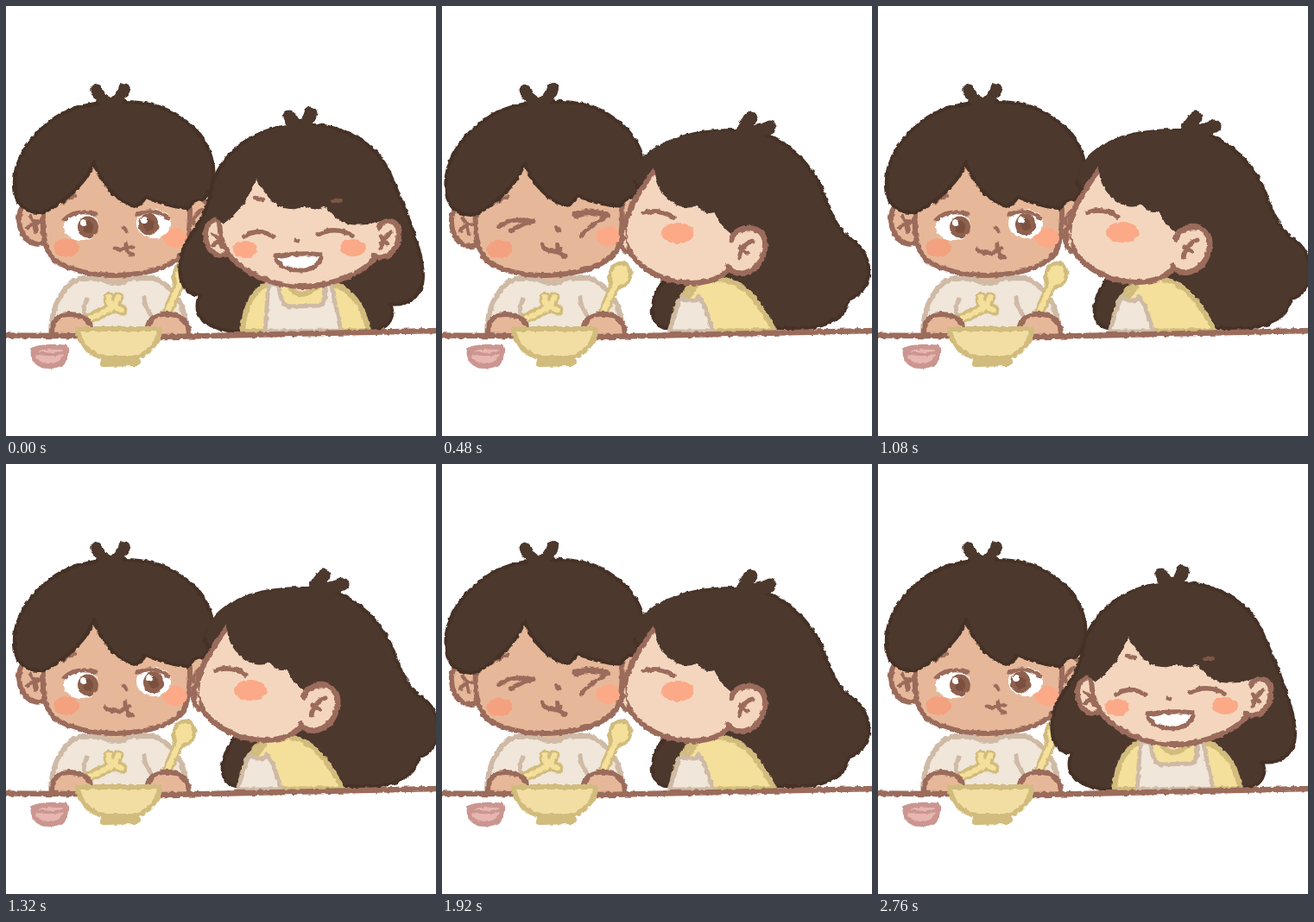
Recreate the animation shown at these times as an HTML page. Size 498x498 px, loop 2880 ms.

```html
<!DOCTYPE html>
<html lang="en">
<head>
<meta charset="utf-8">
<title>Kiss on the cheek</title>
<style>
  html, body { margin: 0; width: 100%; height: 100%; overflow: hidden; background: #fff; }
  svg { display: block; width: 498px; height: 498px; stroke-linecap: round; stroke-linejoin: round; }
</style>
</head>
<body>
<svg viewBox="0 0 498 498">
  <filter id="crayon" filterUnits="userSpaceOnUse" x="0" y="0" width="498" height="498" color-interpolation-filters="sRGB">
    <feTurbulence type="fractalNoise" baseFrequency="0.2" numOctaves="1" seed="4" result="grain"/>
    <feDisplacementMap in="SourceGraphic" in2="grain" scale="4.5" xChannelSelector="R" yChannelSelector="G"/>
  </filter>
  <g id="scene" filter="url(#crayon)"></g>
</svg>
<script>
const STEP = 120, STEPS = 24;
const HAIR = '#4c382d', HAIR_EDGE = '#463126', LINE = '#9b6b5b', IRIS = '#8e604d';
const TAN = '#e6b899', PEACH = '#f4d6be', BLUSH = '#fba987', BLUSH_TAN = '#f4a17f';
const CREAM = '#f0e6d9', CREAM_EDGE = '#cfbaa6', YELLOW = '#f5e09b', YELLOW_EDGE = '#d1bc7d';

const shape = (d, fill, stroke = 'none', w = 6) =>
  `<path d="${d}" fill="${fill}" stroke="${stroke}" stroke-width="${w}"/>`;
const line = (d, w = 4.5, color = LINE) => shape(d, 'none', color, w);
const oval = (x, y, rx, ry, fill) => `<ellipse cx="${x}" cy="${y}" rx="${rx}" ry="${ry}" fill="${fill}"/>`;
const group = (transform, body) => `<g transform="${transform}">${body}</g>`;

// Blend two paths that share the same commands
const NUM = /-?\d+(\.\d+)?/g;
function mix(a, b, k) {
  const to = b.match(NUM);
  let i = 0;
  return a.replace(NUM, v => (+v + (to[i++] - v) * k).toFixed(2));
}

// Front-facing and turned-aside versions of each part of the girl
const GIRL = {
  back: [
    'M343,138C390,135 430,160 445,195C462,235 482,280 483,312C483,338 462,348 445,345C452,360 442,372 432,374L265,377C236,374 214,362 224,335C204,334 198,312 203,290C208,265 232,250 237,215C246,170 290,138 343,138Z',
    'M350,144C394,143 428,174 446,210C456,238 464,258 478,268C508,286 510,328 478,340C474,362 452,371 430,373L266,373C242,368 250,335 264,318C262,300 264,280 266,260C260,235 240,220 230,205C238,160 290,143 350,144Z'],
  tuft: [
    'M341,140Q331,136 328,128M345,138Q351,132 353,124',
    'M358,144Q360,136 368,129M368,145Q380,144 390,139'],
  shirt: [
    'M274,377C276,345 290,322 312,320L372,320C400,325 416,350 419,376Z',
    'M270,377C274,350 282,330 300,320L325,316C358,318 374,348 390,376Z'],
  collar: ['M324,322Q342,346 364,321', 'M288,338Q294,334 299,324'],
  apron: [
    'M304,322L300,377L388,376L376,320L368,320Q373,345 362,347L328,348Q317,346 316,322Z',
    'M280,341L268,377L319,377L309,347L302,336Q300,341 296,341L290,341Q286,341 284,338Z'],
  earL: [
    'M252,248C236,244 228,258 232,272C236,290 250,292 260,285',
    'M285,248C270,244 262,258 264,272C268,290 282,292 292,285'],
  foldL: ['M238,264Q248,268 250,280M240,277L249,269', 'M270,264Q280,268 282,280M272,277L281,269'],
  face: [
    'M247,225C245,262 250,285 268,298C290,317 320,325 343,325C380,324 418,309 432,285C438,268 438,250 436,215C420,150 270,150 247,225Z',
    'M258,186C244,208 222,232 221,264C224,292 250,310 276,317C305,324 335,318 345,299C350,280 350,255 340,220C330,150 275,160 258,186Z'],
  bangs: [
    'M343,139C400,140 440,185 447,240C432,254 405,254 390,249C377,242 376,234 368,231C362,236 352,234 346,229C338,236 320,236 308,224C298,212 292,204 290,195C284,215 270,240 252,250C238,245 240,215 250,195C268,160 300,139 343,139Z',
    'M350,145C395,145 400,200 385,255C375,262 360,262 346,262C336,255 330,245 326,236C318,240 312,236 306,228C296,234 284,230 276,224C264,215 258,206 256,182C253,184 249,186 245,188C239,192 235,196 232,200C238,160 290,145 350,145Z'],
  earR: [
    'M432,256C440,244 456,248 455,265C454,285 440,295 426,289',
    'M345,270C350,250 388,250 384,279C381,307 352,317 341,301'],
  foldR: ['M446,262Q436,268 434,280M434,267L442,276', 'M370,271Q358,274 354,291M355,279L364,285'],
  eyeL: ['M276,267Q291,256 309,267', 'M224,246Q226,242 229,246'],
  eyeR: ['M361,265Q381,254 401,266', 'M243,239Q262,233 278,244'],
  nose: ['M335,271L338,272', 'M222,262L224,263'],
  smile: [
    'M312,290Q340,285 365,288C366,299 352,307 340,306C324,306 314,300 312,290Z',
    'M224,272Q228,270 232,272C232,278 230,282 228,282C226,282 224,278 224,272Z']
};

function girl(k, kiss) {
  const at = name => mix(...GIRL[name], k);
  const lerp = (a, b) => a + (b - a) * k;
  const body =
    shape(at('shirt'), YELLOW, YELLOW_EDGE) +
    shape(at('collar'), PEACH, YELLOW_EDGE) +
    shape(at('apron'), CREAM, CREAM_EDGE, 5);
  let face =
    shape(at('earL'), PEACH, LINE) + line(at('foldL')) +
    shape(at('face'), PEACH, LINE) +
    oval(lerp(402, 283), lerp(280, 262), lerp(15, 19), lerp(10, 12), BLUSH) +
    line(at('eyeR'), 5.5);
  if (k === 1) {
    face += shape('M222,254Q214,261 220,268Q213,275 224,284', PEACH, LINE, 5.5);
  } else {
    face += oval(lerp(277, 228), lerp(282, 280), lerp(14, 3), 10, BLUSH) +
      line(at('eyeL'), 5.5) + line(at('nose'), 5) +
      shape(at('smile'), '#fff', LINE, 5);
    if (!k) face += line('M288,222L298,224');
  }
  const fringe =
    shape(at('bangs'), HAIR, HAIR, 3) +
    (k ? '' : line('M379,226L388,225', 4, '#7d5646')) +
    shape(at('earR'), PEACH, LINE, 6.5) + line(at('foldR'), 5);
  const lean = kiss ? 'translate(-10 1)' : '';
  return group(kiss ? 'translate(-7 0)' : '',
      shape(at('back'), HAIR, HAIR_EDGE, 4)) +
    group(lean, line(at('tuft'), 15, HAIR)) +
    group(kiss ? 'translate(-5 0)' : '', body) +
    group(lean, face + fringe);
}

function openEyes(lookX) {
  const eye = (x, y, px, lid) =>
    oval(x, y, 20, 17, '#fff') +
    oval(px, y + 1, 12, 12.5, IRIS) +
    oval(px, y + 1, 6, 7, '#7b503f') +
    oval(px - 5, y - 4, 4, 4, '#fff') + line(lid, 5);
  return eye(87, 255, 95, 'M67,248Q80,234 105,241') +
    eye(171, 252, lookX, 'M152,242Q170,232 188,246');
}

const shutEyes =
  line('M70,254Q86,243 110,249M83,259Q95,252 110,249', 5) +
  line('M159,243Q176,237 194,244', 8.5) +
  line('M165,268Q172,257 197,245', 5);

function boyBody() {
  const fork = 'M97,362L124,349M119,337Q119,346 124,349L134,352M125,348L130,337';
  const spoon = 'M187,354L201,322';
  const ladle = (grow, color) => group('rotate(24 206 312)', oval(206, 312, 8 + grow, 11 + grow, color));
  return shape('M52,377C53,345 66,325 84,316L170,315C190,322 203,340 207,360L209,379Z', CREAM, CREAM_EDGE) +
    shape('M106,312Q126,330 148,313', TAN, CREAM_EDGE) +
    line('M94,340Q88,350 92,362M160,338Q161,350 168,358', 5, CREAM_EDGE) +
    line(fork, 13, YELLOW_EDGE) + line(fork, 6, YELLOW) +
    line(spoon, 12, YELLOW_EDGE) + ladle(6, YELLOW_EDGE) +
    line(spoon, 6, YELLOW) + ladle(1.5, YELLOW) +
    shape('M53,379C53,358 68,355 82,358C95,360 100,370 98,379', TAN, LINE) +
    shape('M165,379C162,362 175,355 190,357C206,359 212,369 212,380', TAN, LINE);
}

function boyHead(mood) {
  const kissed = mood === 'kissed', shy = mood === 'shy';
  const mouth = kissed ? 'M119,276Q126,289 141,282M137,277Q137,290 146,290'
    : shy ? 'M115,282Q130,291 143,281M138,276Q138,290 146,291'
    : 'M126,281Q136,283 147,279M139,276Q139,287 147,288';
  const head =
    shape('M46,235C38,220 14,224 15,248C16,268 30,280 44,274', TAN, LINE) +
    line('M28,243Q34,250 35,262M25,257Q31,250 39,250') +
    shape('M208,232C216,216 237,222 236,240C235,255 226,266 208,268', TAN, LINE) +
    line('M227,236Q218,240 217,252') +
    shape('M44,225C41,262 43,281 56,294C78,309 105,312 128,312C160,311 192,304 206,285C213,268 214,240 212,215C200,135 60,135 44,225Z', TAN, LINE) +
    oval(70, 280, 15, 11, BLUSH_TAN) +
    oval(196, 269, 14, 11, BLUSH) +
    (kissed ? shutEyes : openEyes(shy ? 171 : 165)) +
    line('M66,227Q73,221 81,220') +
    line('M136,257L139,261') + line(mouth, 5) +
    shape('M12,222C4,190 18,158 56,130C75,118 100,111 122,112C158,108 188,118 203,130C224,144 236,162 240,185C242,202 238,216 228,224C218,224 214,230 211,234C196,234 178,228 162,221C158,228 152,232 148,232C130,226 110,208 102,181C92,206 72,224 44,239C30,240 18,236 12,222Z', HAIR, HAIR_EDGE, 4) +
    line('M118,112Q109,108 105,97M125,112Q133,106 137,96', 13.5, HAIR);
  return group(kissed ? 'translate(-2 0) rotate(-1.7 122 320)' : '', head);
}

const table =
  line('M-6,381.5L190,383L504,376', 6.5) +
  shape('M83,374L178,374C178,392 160,406 146,408L116,408C98,404 84,392 83,374Z', '#f2dda3', YELLOW_EDGE, 6) +
  line('M114,413L151,412', 10, YELLOW_EDGE) +
  shape('M32,398C40,394 62,394 70,396C72,410 62,417 50,417C36,417 30,408 32,398Z', '#e8b6b1', '#cb9690', 6) +
  line('M34,401Q50,406 68,401', 3.5, '#cb9690');

// The girl turns aside, pecks on every even step, then turns back
const TURN_IN = [0, 0.15, 0.4], TURN_OUT = [0.4, 0.25, 0.1, 0];
const BACK_AT = STEPS - TURN_OUT.length;

function draw(step) {
  const k = step < TURN_IN.length ? TURN_IN[step]
    : step >= BACK_AT ? TURN_OUT[step - BACK_AT] : 1;
  const kiss = k === 1 && step % 2 === 0;
  const mood = kiss ? 'kissed' : k > 0.3 ? 'shy' : 'calm';
  scene.innerHTML = boyBody() + boyHead(mood) + girl(k, kiss) + table;
}

const scene = document.getElementById('scene');
const start = performance.now();
let shown = -1;
function tick() {
  const step = Math.floor((performance.now() - start) / STEP) % STEPS;
  if (step !== shown) draw(shown = step);
  requestAnimationFrame(tick);
}
tick();
</script>
</body>
</html>
```
